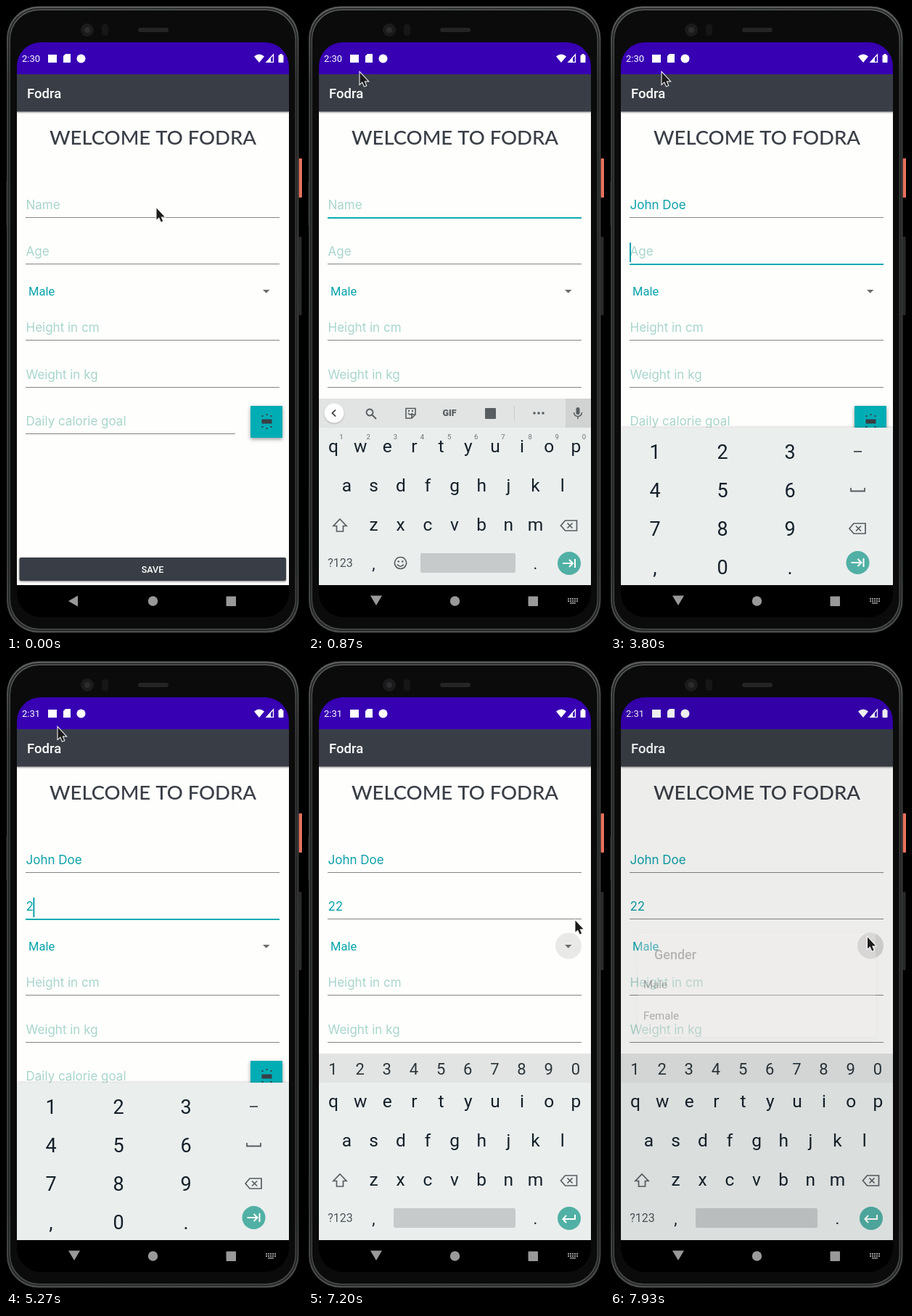
Animation of 408 by 864 pixels, one loop 8000 ms. Source, as an HTML page with a canvas:

```html
<!DOCTYPE html>
<html lang="en">
<head>
<meta charset="utf-8">
<title>Profile form</title>
<style>
html, body { margin: 0; width: 100%; height: 100%; overflow: hidden; background: #000; }
canvas { display: block; width: 408px; height: 864px; }
</style>
</head>
<body>
<canvas id="stage"></canvas>
<script>
const W = 408, H = 864, LOOP = 8000;
const TEAL = '#00adb5', DARK = '#393e46', KEY = '#14202a', ICON = '#575d61';
const BRAND = 'Fodra';
const stage = document.getElementById('stage');
const scale = window.devicePixelRatio || 1;
stage.width = W * scale;
stage.height = H * scale;
const c = stage.getContext('2d');

// [time, text] and [time, suggestions]
const NAME = [[0, ''], [1530, 'J'], [1800, 'Jo'], [1930, 'Joh'], [2130, 'John'],
  [2470, 'John '], [2930, 'John D'], [3200, 'John Do'], [3400, 'John Doe']];
const AGE = [[0, ''], [5270, '2'], [5330, '22']];
const HINTS = [[0, ''], [1600, 'J Just Jo'], [1930, 'Joh John Johnson'], [2200, 'John Johns Johnny'],
  [2530, 'is and I'], [2930, 'D Day Did'], [3200, 'Do Don’t Done'], [3400, 'Doe Don’t Done']];
const MOUSE_OUT = [[530, 207, 278], [870, 71, 91]];
const MOUSE_IN = [[6930, 396, 224], [7000, 390, 265], [7070, 381, 308], [7130, 374, 336],
  [7200, 368, 357], [7400, 359, 373], [7550, 354.5, 380]];

const clamp = v => Math.max(0, Math.min(1, v));
const ease = v => 1 - (1 - v) ** 3;
const latest = (list, t) => list.filter(e => e[0] <= t).pop();

function follow(points, t) {
  let i = 1;
  while (i < points.length - 1 && t > points[i][0]) i++;
  const a = points[i - 1], b = points[i], k = clamp((t - a[0]) / (b[0] - a[0]));
  return [a[1] + (b[1] - a[1]) * k, a[2] + (b[2] - a[2]) * k];
}

function rect(x, y, w, h, fill, r = 0) {
  c.fillStyle = fill;
  c.beginPath();
  c.roundRect(x, y, w, h, r);
  c.fill();
}
function disc(x, y, r, fill) {
  c.fillStyle = fill;
  c.beginPath();
  c.arc(x, y, r, 0, 7);
  c.fill();
}
function fill(d, color) {
  c.fillStyle = color;
  c.fill(new Path2D(d));
}
function line(d, color, width = 1.6) {
  c.strokeStyle = color;
  c.lineWidth = width;
  c.stroke(new Path2D(d));
}
function text(s, x, y, size, color, { font = 'Roboto', weight = 400, align = 'left' } = {}) {
  c.font = `${weight} ${size}px ${font}, sans-serif`;
  c.textAlign = align;
  c.fillStyle = color;
  c.fillText(s, x, y);
}
const mid = (s, x, y, size, color, weight = 400) => text(s, x, y, size, color, { weight, align: 'center' });

function shadowed(blur, dy, alpha, draw) {
  c.save();
  c.shadowColor = `rgba(0,0,0,${alpha})`;
  c.shadowBlur = blur;
  c.shadowOffsetY = dy;
  draw();
  c.restore();
}
function at(x, y, draw) {
  c.save();
  c.translate(x, y);
  draw();
  c.restore();
}

function phone() {
  rect(0, 0, W, H, '#000');
  rect(403.5, 210, 4.5, 54, '#e8705c', 1);
  rect(403.5, 318, 4, 108, '#2a2a2a', 1);
  rect(0, 242, 2, 60, '#1c1c1c');
  const rim = c.createLinearGradient(0, 0, 0, H);
  rim.addColorStop(0, '#5c5e5e');
  rim.addColorStop(0.12, '#3a3c3c');
  rim.addColorStop(0.88, '#3a3c3c');
  rim.addColorStop(1, '#4c4e4e');
  rect(1, 0.5, 402.5, 863, rim, 44);
  rect(3, 3, 398.5, 858, '#1f2121', 42);
  rect(4.5, 4.5, 395.5, 855, rim, 41);
  rect(6, 6, 392.5, 852, '#0b0b0b', 40);
  disc(112, 33, 9, '#1b1b1b');
  disc(112, 33, 4, '#2c2c2e');
  rect(132, 25, 9, 16, '#161616', 4);
  rect(182, 30, 42, 6, '#242424', 3);
}

function statusBar(t) {
  rect(15, 50, 375, 44, '#3700b3');
  text(t < 4330 ? '2:30' : '2:31', 22, 77, 13, '#fff');
  rect(58, 67, 12, 11, '#fff');
  fill('M82 66H89V78H79V69Z', '#fff');
  disc(103.5, 72.5, 6, '#fff');
  fill('M342 69.5Q349 63.5 356 69.5L349 78Z', '#fff');
  line('M368.5 67V77.3H359Z', '#fff', 1.3);
  fill('M365 70.5V77H359Z', '#fff');
  rect(375.5, 67.5, 7, 10.5, '#fff', 1);
  rect(377.5, 66, 3, 2, '#fff');
}

function field(y, hint, value, { end = 377, focus = false, caret = false, composing = 0 } = {}) {
  text(value || hint, 27.5, y - 11.5, 17, value ? '#0aa0a9' : '#a9d5cd', { font: 'Inter' });
  const width = s => c.measureText(s).width;
  if (composing) {
    const start = value.length - composing;
    const x = 27.5 + width(value.slice(0, start));
    rect(x, y - 9, width(value.slice(start)), 1, '#0aa0a9');
  }
  if (caret) rect(27 + (value ? width(value) : 0), y - 29, 2, 27, '#0aa0a9');
  if (focus) rect(27, y, end - 27, 2, '#14a9b2');
  else rect(27, y, end - 27, 1, '#858585');
}

function form(t) {
  rect(15, 145, 375, 653, '#fefefc');
  shadowed(2, 1, 0.35, () => rect(15, 94, 375, 51.5, DARK));
  text(BRAND, 29, 127, 18.5, '#fff', { weight: 500 });
  text('WELCOME TO ' + BRAND.toUpperCase(), 202.5, 191, 27.5, DARK,
    { font: 'Lato', weight: 500, align: 'center' });

  const name = latest(NAME, t), age = latest(AGE, t);
  const onName = t >= 270 && t < 3800, onAge = t >= 3800 && t < 5470;
  const since = t - Math.max(330, name[0], onAge ? Math.max(3800, age[0]) : 0);
  const blink = since >= 0 && since % 1000 < 500;
  const word = name[1].split(' ').pop().length;
  field(291, 'Name', name[1], { focus: onName, caret: onName && blink, composing: onName ? word : 0 });
  field(355, 'Age', age[1], { focus: onAge, caret: onAge && blink });

  if (t >= 5530) {
    const shade = t < 7670 ? '#e9e9e8' : '#dadad8';
    disc(359, 392.5, 18 * ease(clamp((t - 5470) / 240)), shade);
  }
  text('Male', 31, 399, 16.5, '#06a3ab');
  fill('M354 391H363.5L358.7 395.8Z', '#6c6c6c');
  field(460, 'Height in cm', '');
  field(525, 'Weight in kg', '');
  field(589, 'Daily calorie goal', '', { end: 316 });

  shadowed(5, 2, 0.4, () => rect(337, 551, 44, 44, TEAL));
  rect(352.5, 569.5, 14, 6, DARK);
  for (const [x, y] of [[353, 565], [359, 563], [365, 565], [353, 580], [359, 582], [365, 580]])
    rect(x - 0.5, y - 1, 2, 2, DARK);

  shadowed(3, 1, 0.5, () => rect(18.5, 760, 367.5, 32, DARK, 2));
  mid('SAVE', 202, 781, 12.5, '#fff', 500);
}

function backspace(x, y) {
  at(x, y, () => line('M-11 0L-5 -7H11V7H-5ZM-2 -3.5L5 3.5M5 -3.5L-2 3.5', ICON, 1.7));
}
function action(x, y, icon) {
  disc(x, y, 16, '#51b0a5');
  at(x, y, () => line(icon, '#fff', 2));
}
const TAB = 'M-9 0H5M0 -5L5 0L0 5M8 -6V6';
const ENTER = 'M8 -5V1H-8M-4 -4L-8.5 1L-4 6';

function mic() {
  rect(355, 541, 35, 40, '#d0d3d2');
  rect(369.5, 553, 5, 10, ICON, 2.5);
  line('M366.5 560Q367 565.5 372 565.5Q377 565.5 377.5 560M372 565V569', ICON, 1.5);
}

function toolStrip() {
  line('M85 555.5a4.5 4.5 0 1 0 .1 0ZM88.5 563.5L94 569', ICON, 1.9);
  line('M135 554.5H148V563L143 568H135ZM148 563H143V568M138 561Q141 565 144 561', ICON, 1.6);
  rect(138, 557, 2, 2, ICON);
  rect(143, 557, 2, 2, ICON);
  mid('GIF', 195, 565, 12.5, ICON, 900);
  rect(244, 554, 15, 15, ICON, 1);
  rect(284, 551, 1, 20, '#c9cccc');
  for (const x of [312, 318, 324]) disc(x, 561, 1.8, ICON);
}

function strip(t) {
  rect(15, 541, 375, 40, '#e2e4e3');
  if (t >= 5470) {
    [...'1234567890'].forEach((k, i) => mid(k, 34.5 + 37.15 * i, 570, 22, '#2a353b'));
    return;
  }
  mic();
  const words = latest(HINTS, t)[1];
  shadowed(2, 1, 0.25, () => disc(36, 561, 13.5, '#fff'));
  line(words ? 'M34 556.5L38.5 561L34 565.5' : 'M38 556.5L33.5 561L38 565.5', '#333', 1.7);
  if (!words) return toolStrip();
  words.split(' ').forEach((w, i) => mid(w, [97, 201, 305][i], 567, 16, '#5c6265'));
  rect(146, 550, 1, 22, '#c3c6c6');
  rect(256, 550, 1, 22, '#c3c6c6');
}

function letters(t) {
  const plain = t >= 5470;
  rect(15, 541, 375, 257, '#eaeeed');
  strip(t);
  const row = (keys, x, y) => [...keys].forEach((k, i) => mid(k, x + 37.15 * i, y, 24.5, KEY));
  row('qwertyuiop', 35, 615);
  row('asdfghjkl', 53.5, 669);
  row('zxcvbnm', 90.5, 723);
  if (!plain) [...'1234567890'].forEach((k, i) => mid(k, 46 + 37.15 * i, 597, 9.5, '#6b7174'));
  line('M44 707L53 716.5H48.5V724H39.5V716.5H35Z', ICON, 1.7);
  backspace(359.5, 716);
  mid('?123', 44.5, 773, 16, '#4d5559');
  mid(',', 90.5, 776, 22, KEY);
  mid('.', 313.5, 776, 22, KEY);
  const left = plain ? 118 : 155;
  rect(left, 754, 286 - left, 27, '#c6cacb', 2);
  if (!plain) {
    line('M127.5 759.5a8 8 0 1 0 .1 0ZM123 769.5Q127.5 775 132 769.5', ICON, 1.6);
    disc(124.7, 765.5, 1.3, ICON);
    disc(130.3, 765.5, 1.3, ICON);
  }
  action(360, 768, plain ? ENTER : TAB);
}

function numbers() {
  shadowed(3, -1, 0.15, () => rect(15, 581, 375, 217, '#eaeeed'));
  ['123', '456', '789', ',0.'].forEach((keys, r) =>
    [...keys].forEach((k, i) => mid(k, 62 + 93 * i, 623.5 + 53 * r, 27, KEY)));
  rect(336, 613, 11, 2, ICON);
  line('M332 664V668.5H351V664', ICON, 1.8);
  backspace(341, 720);
  action(341.5, 767, TAB);
}

function keyboard(t) {
  if (t < 400) return;
  c.save();
  c.beginPath();
  c.rect(15, 530, 375, 268);
  c.clip();
  c.translate(0, 257 * (1 - ease(clamp((t - 400) / 200))));
  if (t >= 3800 && t < 5470) numbers();
  else letters(t);
  c.restore();
}

function navBar(t) {
  const gray = '#999';
  rect(15, 798, 375, 44, '#000');
  fill(t < 400 ? 'M86 820L99 812.5V827.5Z' : 'M86 812.5H102L94 826Z', gray);
  disc(202.5, 820, 6.7, gray);
  rect(303.5, 813.5, 13.5, 13.5, gray, 1);
  if (t < 400) return;
  for (let y = 0; y < 2; y++)
    for (let x = 0; x < 5; x++) rect(358 + 3 * x, 816 + 3 * y, 2, 2, gray);
  rect(361, 822, 8, 1.5, gray);
}

function dialog(t) {
  if (t < 7795) return;
  const p = clamp((t - 7770) / 160);
  rect(15, 50, 375, 748, `rgba(0,0,0,${0.065 * p})`);
  c.save();
  c.globalAlpha = 0.3 * p;
  shadowed(6, 2, 0.08, () => rect(39, 375, 327, 143, '#fbf9f9', 2));
  text('Gender', 61, 411, 18, '#333', { weight: 500 });
  text('Male', 46, 451, 15, '#111');
  text('Female', 46, 494, 15, '#111');
  c.restore();
}

function pointer(t) {
  if (t >= 6600 && t < 6930) return;
  const [x, y] = follow(t < 6600 ? MOUSE_OUT : MOUSE_IN, t);
  at(x, y, () => {
    const arrow = 'M0.5 0.5V16.5L4 13.3L6.7 19.5L9.2 18.4L6.6 12.4H11.6Z';
    line(arrow, '#fff', 2);
    fill(arrow, '#1c1c1c');
  });
}

function draw(t) {
  c.setTransform(scale, 0, 0, scale, 0, 0);
  phone();
  c.save();
  c.beginPath();
  c.roundRect(15, 50, 375, 792, 33);
  c.clip();
  form(t);
  statusBar(t);
  keyboard(t);
  navBar(t);
  dialog(t);
  c.restore();
  pointer(t);
}

const start = performance.now();
function tick() {
  draw((performance.now() - start) % LOOP);
  requestAnimationFrame(tick);
}
tick();
</script>
</body>
</html>
```
